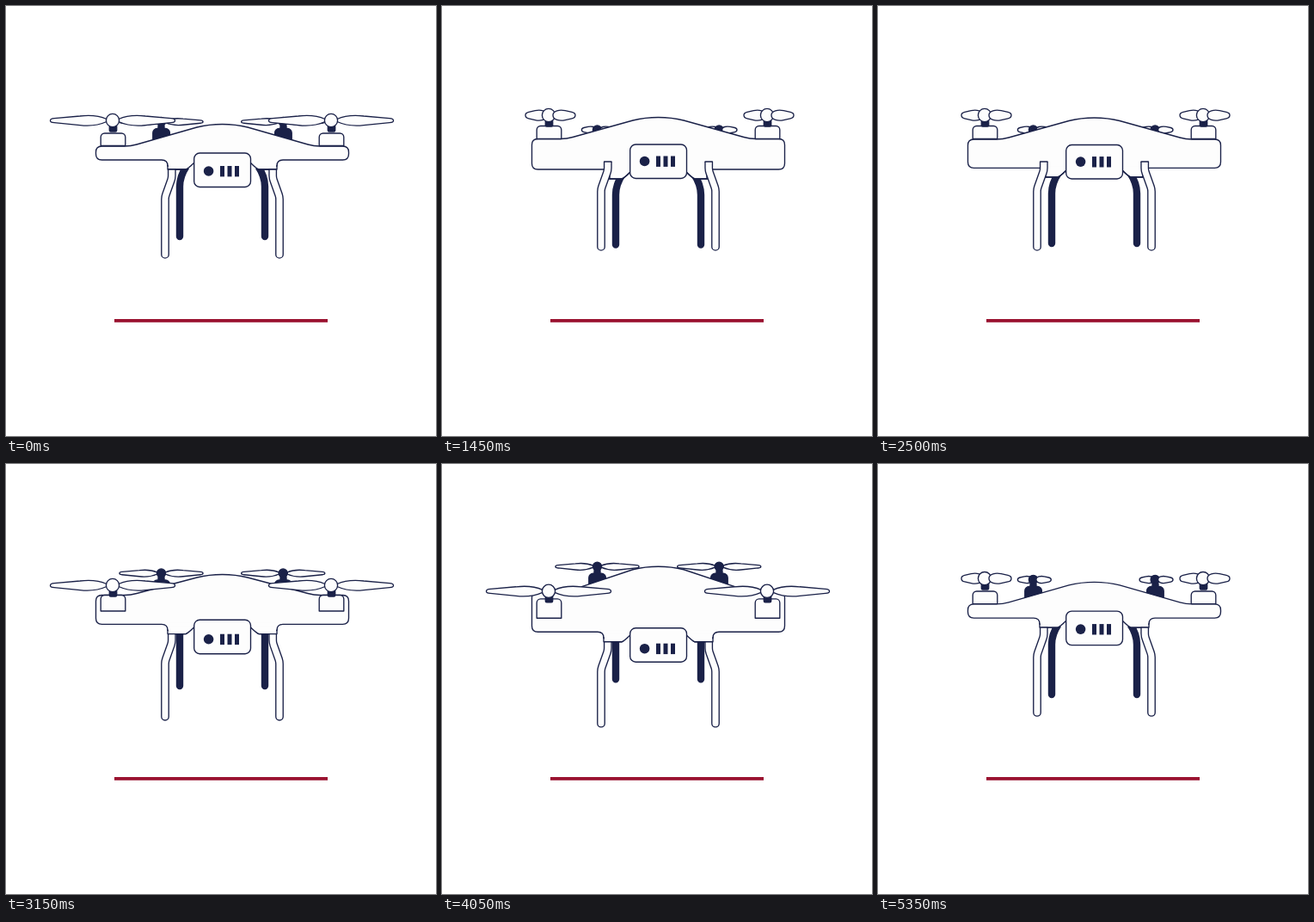
Recreate the animation shown at these times as an HTML page with a canvas. Size 500 by 500 pixels, loop 5.4 s.

```html
<!DOCTYPE html>
<html lang="en">
<head>
<meta charset="utf-8">
<title>Drone</title>
<style>
html, body { margin: 0; width: 100%; height: 100%; overflow: hidden; background: #fff; }
canvas { display: block; width: 500px; height: 500px; }
</style>
</head>
<body>
<canvas id="stage" width="500" height="500"></canvas>
<script>
const ctx = document.getElementById('stage').getContext('2d');
const NAVY = '#1a2148', RED = '#9a1230', WHITE = '#fff', SHELL = '#fdfdfd';
const LOOP = 5400, STEP = 50, MID = 251.5, LINE = 1.35;

// Heights of the parts at the main poses of the tilt
const NAMES = ['hub', 'boxTop', 'boxBot', 'armTop', 'armBot', 'top', 'cam',
  'legTop', 'legBot', 'belly', 'backHub', 'backBot'];
const TIMES = [0, 750, 1450, 2500, 3150, 3950];
const POSES = [
  [133, 148, 162.5, 163, 179, 137.5, 171, 190, 293.5, 190, 134.5, 272],
  [130.5, 144.5, 159.5, 159.5, 183, 135, 167, 187, 290, 193, 138.5, 275.5],
  [127, 139.5, 154.5, 154.5, 190, 129.5, 161, 181, 284.5, 201, 144, 281.5],
  [127, 139.5, 154.5, 155, 188.3, 130, 161.5, 181, 284.5, 199, 144, 280],
  [141, 152.5, 171, 152.5, 186.3, 128.5, 181.2, 197.6, 298.4, 197.6, 127, 262],
  [148, 157, 179.5, 148, 195.5, 119, 191, 207, 306.5, 207, 119, 254]
];
const LAST = TIMES.length - 1;

// The tilt comes to rest at the neutral and the most forward pose
function slope(i, k) {
  if (i === 0 || i === LAST) return 0;
  return (POSES[i + 1][k] - POSES[i - 1][k]) / (TIMES[i + 1] - TIMES[i - 1]);
}

function poseAt(t) {
  let i = LAST;
  while (TIMES[i] > t) i--;
  const j = (i + 1) % TIMES.length;
  const span = (j ? TIMES[j] : LOOP) - TIMES[i];
  const u = (t - TIMES[i]) / span, v = 1 - u;
  const pose = {};
  NAMES.forEach((name, k) => {
    pose[name] = POSES[i][k] * v * v * (1 + 2 * u) + POSES[j][k] * u * u * (3 - 2 * u) +
      span * u * v * (slope(i, k) * v - slope(j, k) * u);
  });
  return pose;
}

function paint(fill) {
  ctx.fillStyle = fill;
  ctx.fill();
  ctx.stroke();
}

function box(x, y, w, h, r, fill) {
  ctx.beginPath();
  ctx.roundRect(x, y, w, h, r);
  paint(fill);
}

function disc(x, y, r, fill) {
  ctx.beginPath();
  ctx.arc(x, y, r, 0, Math.PI * 2);
  paint(fill);
}

function mirrored(draw) {
  draw();
  ctx.save();
  ctx.translate(MID * 2, 0);
  ctx.scale(-1, 1);
  draw();
  ctx.restore();
}

function longBlade(x, y, k, dir) {
  const px = d => x + d * k * dir, py = d => y + d * k;
  ctx.beginPath();
  ctx.moveTo(px(7), py(-1.5));
  ctx.bezierCurveTo(px(17), py(-6), px(26), py(-6.4), px(38), py(-5));
  ctx.lineTo(px(68), py(-2.4));
  ctx.bezierCurveTo(px(74), py(-2), px(74), py(2.4), px(68), py(2.6));
  ctx.lineTo(px(38), py(5.6));
  ctx.bezierCurveTo(px(26), py(7), px(17), py(6), px(7), py(1.5));
  ctx.closePath();
  paint(SHELL);
}

// Foreshortened blade: broad at the root, narrow at the tip
function shortBlade(x, y, k, from, to) {
  const px = u => x + (from + (to - from) * u) * k, py = d => y + d * k;
  ctx.beginPath();
  ctx.moveTo(px(0), py(0));
  ctx.bezierCurveTo(px(0), py(-5.5), px(0.3), py(-6.6), px(0.55), py(-5.4));
  ctx.lineTo(px(0.85), py(-3.7));
  ctx.bezierCurveTo(px(1.05), py(-2.6), px(1.05), py(2.8), px(0.85), py(3.9));
  ctx.lineTo(px(0.55), py(5.6));
  ctx.bezierCurveTo(px(0.3), py(7), px(0), py(5.5), px(0), py(0));
  paint(SHELL);
}

function propeller(x, y, k, hubFill, phase) {
  const hub = () => disc(x, y, 7.6 * k, hubFill);
  if (phase === 0) {
    longBlade(x, y, k, -1);
    longBlade(x, y, k, 1);
    hub();
    return;
  }
  const dir = phase === 1 ? -1 : 1;
  shortBlade(x, y, k, -2 * dir, -27 * dir);
  hub();
  shortBlade(x, y, k, 5 * dir, 31 * dir);
}

function backLeg(p) {
  const top = p.backBot - 83;
  ctx.beginPath();
  ctx.moveTo(210, top - 3);
  ctx.quadraticCurveTo(202, top + 9, 202, top + 21);
  ctx.lineTo(202, p.backBot - 4);
  ctx.lineWidth = 8.4;
  ctx.stroke();
  ctx.lineWidth = LINE;
}

function backMotor(p) {
  box(177, p.backHub + 4, 7, 8, 1, NAVY);
  box(170.8, p.backHub + 8, 19.6, 15, [5, 5, 0, 0], NAVY);
}

function belly(p) {
  const x = 188 + Math.max(0, Math.min(7, p.belly - p.legTop));
  const y = p.belly, far = MID * 2;
  ctx.beginPath();
  ctx.moveTo(x, p.armBot - 6);
  ctx.lineTo(x, y);
  ctx.lineTo(209, y);
  ctx.quadraticCurveTo(212, y - 1, 219, y - 8);
  ctx.lineTo(far - 219, y - 8);
  ctx.quadraticCurveTo(far - 212, y - 1, far - 209, y);
  ctx.lineTo(far - x, y);
  ctx.lineTo(far - x, p.armBot - 6);
  paint(SHELL);
}

function body(p) {
  const far = MID * 2, a = p.armTop, b = p.armBot, top = p.top, r = 7;
  const joined = p.belly - p.legTop < 2;
  ctx.beginPath();
  ctx.moveTo(MID, top);
  ctx.quadraticCurveTo(236, top, 222, top + 3.5);
  ctx.lineTo(152, a - 2);
  ctx.quadraticCurveTo(145, a, 138, a);
  ctx.lineTo(104.5 + r, a);
  ctx.quadraticCurveTo(104.5, a, 104.5, a + r);
  ctx.lineTo(104.5, b - r);
  ctx.quadraticCurveTo(104.5, b, 104.5 + r, b);
  ctx.lineTo(181, b);
  if (joined) ctx.quadraticCurveTo(188, b, 188, b + 7);
  else ctx.lineTo(188, b);
  ctx.lineTo(far - 188, joined ? b + 7 : b);
  if (joined) ctx.quadraticCurveTo(far - 188, b, far - 181, b);
  ctx.lineTo(far - 104.5 - r, b);
  ctx.quadraticCurveTo(far - 104.5, b, far - 104.5, b - r);
  ctx.lineTo(far - 104.5, a + r);
  ctx.quadraticCurveTo(far - 104.5, a, far - 104.5 - r, a);
  ctx.lineTo(far - 138, a);
  ctx.quadraticCurveTo(far - 145, a, far - 152, a - 2);
  ctx.lineTo(far - 222, top + 3.5);
  ctx.quadraticCurveTo(far - 236, top, MID, top);
  paint(SHELL);
  // Open the seam between body and belly
  ctx.fillRect(190, b - 2, far - 380, Math.max(0, p.belly - 7 - b));
  if (joined) ctx.fillRect(189, b + 2, far - 378, p.belly - b - 3);
}

function bellyEdge(p) {
  ctx.beginPath();
  ctx.moveTo(190, p.belly);
  ctx.lineTo(209, p.belly);
  ctx.quadraticCurveTo(212, p.belly - 1, 219, p.belly - 8);
  ctx.stroke();
}

function frontLeg(p) {
  const y = p.legTop;
  ctx.save();
  ctx.beginPath();
  ctx.rect(170, y, 40, 130);
  ctx.clip();
  ctx.beginPath();
  ctx.moveTo(192.8, y);
  ctx.arcTo(192.8, y + 10, 185, y + 32, 16);
  ctx.arcTo(185, y + 32, 185, p.legBot, 16);
  ctx.lineTo(185, p.legBot - 4.6);
  for (const [width, color] of [[9.8, NAVY], [7.1, SHELL]]) {
    ctx.lineWidth = width;
    ctx.strokeStyle = color;
    ctx.stroke();
  }
  ctx.restore();
  ctx.beginPath();
  ctx.moveTo(188.6, y);
  ctx.lineTo(197, y);
  ctx.stroke();
}

function camera(p) {
  const y = p.cam, dot = y + 19.5 + (y - 161) * 0.15;
  box(218.7, y, 65.8, 39.5, 6.5, SHELL);
  ctx.fillStyle = NAVY;
  ctx.beginPath();
  ctx.arc(235.6, dot, 5.8, 0, Math.PI * 2);
  ctx.fill();
  for (let i = 0; i < 3; i++) ctx.fillRect(249 + i * 8.5, dot - 6, 5, 12.4);
}

function frontMotor(p) {
  box(110.2, p.boxTop, 28.6, p.boxBot - p.boxTop, [4.5, 4.5, 0, 0], SHELL);
  box(120.3, p.hub + 5, 8.4, 8, 1.5, NAVY);
}

function draw(t) {
  const frame = Math.floor(t / STEP), p = poseAt(frame * STEP), phase = frame % 3;
  ctx.fillStyle = WHITE;
  ctx.fillRect(0, 0, 500, 500);
  ctx.fillStyle = RED;
  ctx.fillRect(126, 364, 248, 3.8);
  ctx.strokeStyle = NAVY;
  ctx.lineWidth = LINE;
  ctx.lineJoin = 'round';
  ctx.lineCap = 'round';

  mirrored(() => backLeg(p));
  mirrored(() => backMotor(p));
  for (const x of [180.5, 322.2]) propeller(x, p.backHub, 0.67, NAVY, phase);
  belly(p);
  body(p);
  mirrored(() => bellyEdge(p));
  mirrored(() => frontLeg(p));
  camera(p);
  mirrored(() => frontMotor(p));
  for (const x of [124, 378]) propeller(x, p.hub, 1, SHELL, phase);
}

const start = performance.now();
function tick() {
  draw((performance.now() - start) % LOOP);
  requestAnimationFrame(tick);
}
tick();
</script>
</body>
</html>
```
